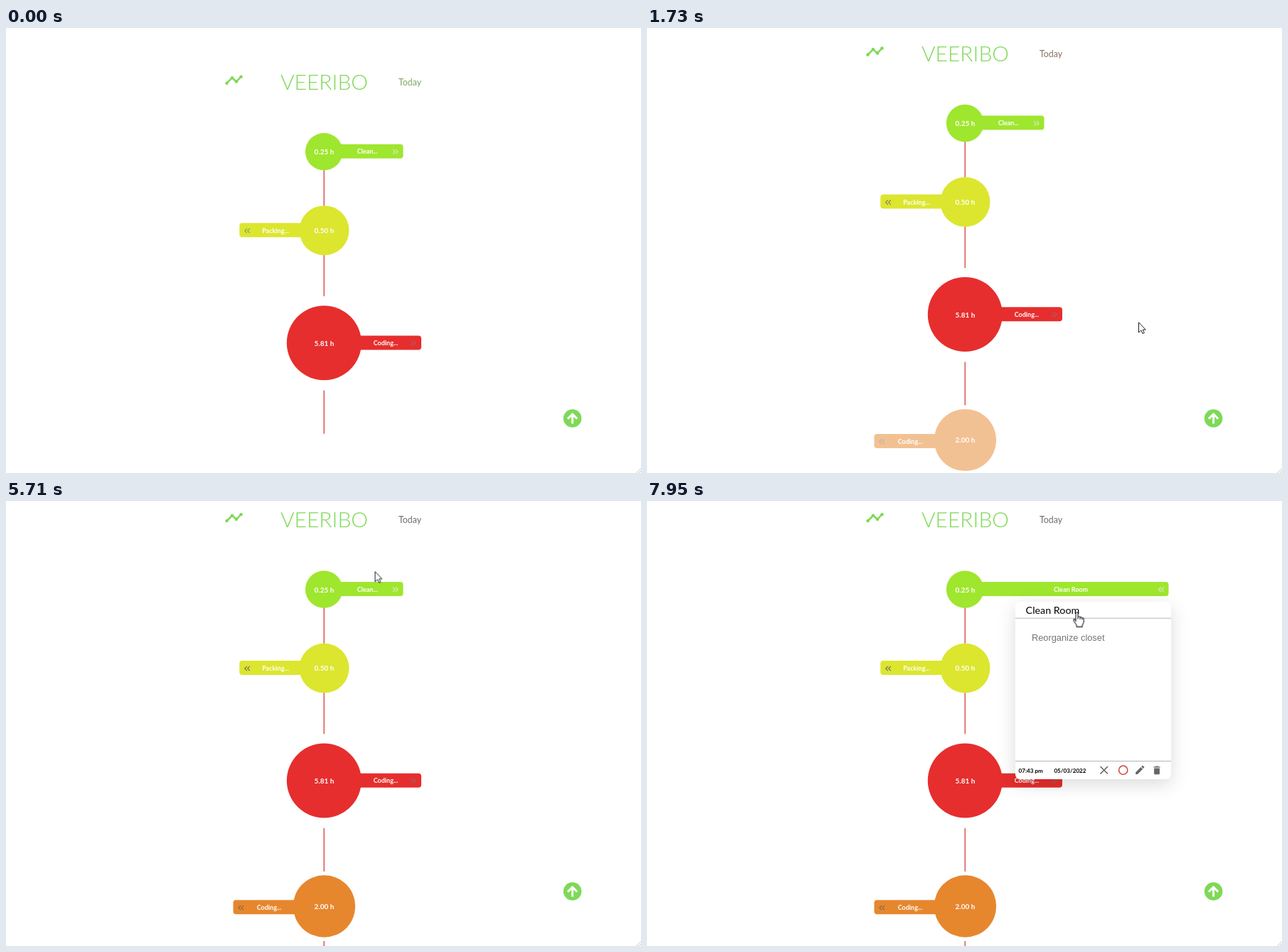
An HTML page that plays this animation: 893 by 627 pixels, repeating every 8000 ms.

```html
<!DOCTYPE html>
<html lang="en">
<head>
<meta charset="utf-8">
<title>Task timeline</title>
<style>
  html, body { margin: 0; width: 100%; height: 100%; overflow: hidden; background: #fff; }
  svg { display: block; width: 893px; height: 627px; font-family: Lato, sans-serif; }
  svg * { animation: 8s linear infinite; }

  .brand { fill: #7ed957; }
  .title { font-size: 30px; font-weight: 300; }
  .mid { text-anchor: middle; }
  .today { font-size: 12.4px; fill: currentColor; }
  .rail { stroke: #df6662; stroke-width: 1.7; }
  .hours { font: bold 10px Lato, sans-serif; fill: #fff; }
  .label { font: bold 9px Lato, sans-serif; fill: #fff; }
  .chev { fill: none; stroke: currentColor; stroke-width: 1.1; }

  #page { animation-name: scroll; }
  .tint { color: #6b6b6b; animation-name: tint; animation-timing-function: step-end; }
  #late { animation-name: late; }
  #bar { animation-name: bar; }
  #barText { animation-name: barText; }
  #barChev { animation-name: barChev; }
  .closed { animation-name: closed; }
  .open { animation-name: open; }
  #card {
    transform-origin: 627.5px 267px;
    filter: drop-shadow(0 7px 12px rgba(0, 0, 0, .14));
    animation-name: card;
  }
  #cursor { animation-name: move; }
  #arrow { animation-name: arrow; }
  #beam { animation-name: beam; }
  #hand { animation-name: hand; }

  @keyframes scroll {
    0%, 12.125% { transform: translateY(49.7px); }
    13.75% { transform: translateY(39.3px); }
    17.5% { transform: translateY(21px); }
    21.5%, 22.75% { transform: translateY(9.6px); }
    27.25%, 30.5% { transform: translateY(3.4px); }
    33.375%, 100% { transform: none; }
  }
  @keyframes tint {
    0% { color: #7da565; }
    12.625% { color: #74745f; }
    21.25% { color: #8b7063; }
    30.75%, 100% { color: #6b6b6b; }
  }
  @keyframes late {
    0%, 19.375% { opacity: 0; animation-timing-function: ease; }
    26.875%, 100% { opacity: 1; }
  }
  @keyframes bar {
    0%, 78.5% { width: 98.5px; animation-timing-function: ease; }
    85%, 100% { width: 273.5px; }
  }
  @keyframes barText {
    0%, 78.5% { transform: none; animation-timing-function: ease; }
    85%, 100% { transform: translateX(88px); }
  }
  @keyframes barChev {
    0%, 78.5% { transform: none; animation-timing-function: ease; }
    85%, 100% { transform: translateX(175.5px); }
  }
  @keyframes closed {
    0%, 78.74% { visibility: visible; }
    78.75%, 100% { visibility: hidden; }
  }
  @keyframes open {
    0%, 78.74% { visibility: hidden; }
    78.75%, 100% { visibility: visible; }
  }
  @keyframes card {
    0%, 85.625% { opacity: 0; transform: translateX(85px) scale(.63); animation-timing-function: ease; }
    90.375%, 100% { opacity: 1; transform: none; }
  }
  @keyframes move {
    0%, 2.5% { transform: translate(872px, 586px); animation-timing-function: ease-out; }
    7.125%, 40.75% { transform: translate(691px, 414px); }
    42.875%, 54.75% { transform: translate(674px, 402px); animation-timing-function: ease-in-out; }
    61.375%, 63.375% { transform: translate(404.5px, 41px); animation-timing-function: ease-in-out; }
    66.25%, 68.875% { transform: translate(492.5px, 34px); }
    71.375% { transform: translate(518.5px, 98.5px); animation-timing-function: ease-out; }
    75%, 88.75% { transform: translate(527.5px, 124px); animation-timing-function: ease-in-out; }
    99.375%, 100% { transform: translate(604.5px, 156.5px); }
  }
  @keyframes arrow {
    0%, 2.49% { visibility: hidden; }
    2.5%, 60.62% { visibility: visible; }
    60.63%, 69.87% { visibility: hidden; }
    69.88%, 73.12% { visibility: visible; }
    73.13%, 100% { visibility: hidden; }
  }
  @keyframes beam {
    0%, 60.62% { visibility: hidden; }
    60.63%, 69.87% { visibility: visible; }
    69.88%, 100% { visibility: hidden; }
  }
  @keyframes hand {
    0%, 73.12% { visibility: hidden; }
    73.13%, 100% { visibility: visible; }
  }
</style>
</head>
<body>
<svg viewBox="0 0 893 627">
  <defs>
    <path id="right" d="M-3.6-3.2L-.4 0L-3.6 3.2M.4-3.2L3.6 0L.4 3.2"/>
    <path id="left" d="M3.6-3.2L.4 0L3.6 3.2M-.4-3.2L-3.6 0L-.4 3.2"/>
  </defs>

  <g id="page">
    <g class="brand">
      <path d="M310.5 28L318 20.5L324 25.8L330.5 19" fill="none" stroke="#7ed957" stroke-width="2.5"/>
      <circle cx="310.5" cy="28" r="2.3"/>
      <circle cx="318" cy="20.5" r="2.3"/>
      <circle cx="324" cy="25.8" r="2.3"/>
      <circle cx="330.5" cy="19" r="2.3"/>
      <text class="title mid" x="447.5" y="37">VEERIBO</text>
    </g>
    <text class="today tint" x="552" y="31">Today</text>

    <path class="rail" d="M447.3 150V201M447.3 270V328.3M447.3 461V522M447.3 620V680"/>

    <g fill="#9fe62e">
      <rect id="bar" x="460" y="114" width="98.5" height="20" rx="4"/>
      <circle cx="447.2" cy="124.5" r="26.3"/>
      <text class="hours mid" x="447.5" y="128.7">0.25 h</text>
      <g id="barText" class="label mid">
        <text class="closed" x="508.3" y="127.8">Clean...</text>
        <text class="open" x="508" y="127.8">Clean Room</text>
      </g>
      <g id="barChev" class="chev" color="#dfe8d4">
        <use class="closed" href="#right" x="547.5" y="124.7"/>
        <use class="open" href="#left" x="547.5" y="124.7"/>
      </g>
    </g>

    <g fill="#dce62e">
      <rect x="328.3" y="225" width="110" height="20" rx="4"/>
      <circle cx="447.5" cy="235.5" r="35"/>
      <text class="hours mid" x="447.5" y="239.4">0.50 h</text>
      <text class="label mid" x="379" y="239.2">Packing...</text>
      <g class="tint"><use class="chev" href="#left" x="339.3" y="236"/></g>
    </g>

    <g fill="#e62e2e">
      <rect x="474" y="383.7" width="110" height="20" rx="4"/>
      <circle cx="447.3" cy="394" r="52.5"/>
      <text class="hours mid" x="447.5" y="398.4">5.81 h</text>
      <text class="label mid" x="534" y="397.4">Coding...</text>
      <use class="chev" color="#a5605a" href="#right" x="572.8" y="394.2"/>
    </g>

    <g id="late" fill="#e6872e">
      <rect x="319.5" y="562.3" width="110" height="20" rx="4"/>
      <circle cx="447.5" cy="571" r="43.7"/>
      <text class="hours mid" x="447.5" y="574.8">2.00 h</text>
      <text class="label mid" x="370" y="576">Coding...</text>
      <use class="chev" color="#84664e" href="#left" x="330.5" y="573"/>
    </g>
  </g>

  <circle class="brand" cx="796.6" cy="550" r="12.8"/>
  <path d="M796.6 557.5V544.5M790 550.6L796.6 544L803.2 550.6" fill="none" stroke="#fff" stroke-width="3"/>
  <path d="M886.5 627L893 620.5M890 627L893 624" stroke="#c9c3a4"/>

  <g id="card">
    <rect x="518" y="142" width="219" height="250" rx="7" fill="#fff"/>
    <path d="M518 165.2H737M518 366.5H737" stroke="#b5b5bb"/>
    <text x="532.6" y="158.5" font-size="14.3">Clean Room</text>
    <text x="541" y="197" font-size="12.8" fill="#757575" style="font-family: 'Liberation Sans', sans-serif">Reorganize closet</text>
    <g font-size="8.1" font-weight="bold">
      <text x="522.6" y="382.6">07:43 pm</text>
      <text x="572.4" y="382.6">05/03/2022</text>
    </g>
    <path d="M637.5 374L648 384.5M648 374L637.5 384.5" stroke="#666" stroke-width="1.6"/>
    <circle cx="669.7" cy="379.2" r="6.1" fill="none" stroke="#cf4740" stroke-width="1.5"/>
    <g fill="#666">
      <path d="M687.2 385V382.3L694.4 375.1L697.1 377.8L689.9 385ZM695.2 374.3L696.5 373Q697 372.6 697.5 373L699.1 374.6Q699.6 375.1 699.1 375.6L697.9 377Z"/>
      <path d="M712.5 374.2H715L715.6 373.4H718.4L719 374.2H721.5V375.6H712.5ZM713.1 376.5H720.9V384Q720.9 385.2 719.7 385.2H714.3Q713.1 385.2 713.1 384Z"/>
    </g>
  </g>

  <g id="cursor" fill="#fff" stroke="#1c1c28" stroke-linejoin="round">
    <path id="arrow" d="M.5 .8V15L3.8 11.9L6 16.6L8.3 15.6L6.2 11.1H10.3Z"/>
    <path id="beam" fill="none" d="M-3-6.5H-1L0-5.8L1-6.5H3M0-6V6M-3 6.5H-1L0 5.8L1 6.5H3"/>
    <path id="hand" stroke-width="1.1" d="M-1.5 13V1.6Q-1.5 .3 0 .3Q1.6 .3 1.6 1.6V6.6Q4 5.6 4.5 7.3Q7 6.6 7.2 8.3Q9.6 7.8 9.6 10V14Q9.4 16.4 7.8 18V20.6H-.4V18.3L-4.6 12.2Q-5.4 10.4-3.8 10.1Q-2.8 10.1-1.5 12ZM1.6 6.6V10M4.5 7.3V10.3M7.2 8.3V10.8"/>
  </g>
</svg>
</body>
</html>
```
